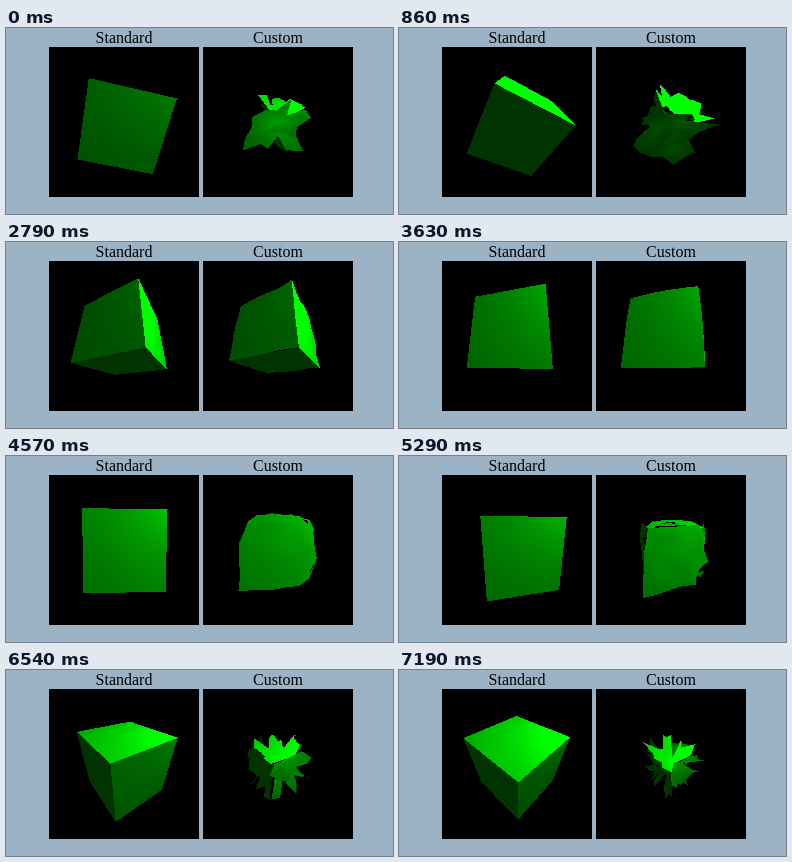
Recreate the animation shown at these times as an HTML page with a canvas. Size 387 px wide and 186 px high, loop 7290 ms.

```html
<!DOCTYPE html>
<html lang="en">
<head>
<meta charset="utf-8">
<title>Standard and custom cube</title>
<style>
  html, body { margin: 0; width: 100%; height: 100%; overflow: hidden; background: #9bb3c4; }
  #stage { position: relative; width: 387px; height: 186px; }
  .panel { position: absolute; top: 0; width: 150px; text-align: center;
           font: 16px/19px "Liberation Serif", "Times New Roman", serif; color: #000; }
  canvas { display: block; width: 150px; height: 150px; background: #000; }
</style>
</head>
<body>
<div id="stage">
  <div class="panel" style="left:43px">Standard<canvas id="standard" width="150" height="150"></canvas></div>
  <div class="panel" style="left:197px">Custom<canvas id="custom" width="150" height="150"></canvas></div>
</div>
<script>
const LOOP = 7290, LAST = 7190;
const SIZE = 150, HALF = SIZE / 2;
const FOCAL = 107, DISTANCE = 3.55;
const LIGHT = 2;                  // light sits at (2, 2, 2)
const AMBIENT = 51;
const BLACK = 0xff000000;

const mix = (a, b, k) => a + (b - a) * k;
const clamp = k => Math.min(1, Math.max(0, k));
const ease = k => { k = clamp(k); return k * k * (3 - 2 * k); };
const random = seed => { const r = Math.sin(seed * 12.9898) * 43758.5453; return r - Math.floor(r); };

// Poses are held in steps that slowly grow longer.
function heldTime(ms) {
  const first = 50, step = 57.6, growth = .0125;
  if (ms < first) return 0;
  const t = Math.min(ms, LAST);
  const n = Math.floor((Math.sqrt(step * step + 4 * growth * (t - first)) - step) / (2 * growth) + .2);
  return first + n * step + n * n * growth;
}

function rotate([x, y, z], angle) {
  const c = Math.cos(angle), s = Math.sin(angle);
  const rx = x * c + y * s, ry = y * c - x * s;
  return [rx, ry * c - z * s, ry * s + z * c];
}

function project(p) {
  const q = 1 / (DISTANCE - p[2]);
  return { q, x: HALF + FOCAL * p[0] * q, y: HALF - FOCAL * p[1] * q };
}

// Vertices spread from a crumpled core to the full cube and back, rounding its corners on the way.
function deformer(t) {
  const fold = 1 - Math.sin(Math.PI * t / LOOP);
  const rounding = ease((t - 3300) / 1200);
  return (p, seed) => {
    const wave = .5 + .5 * Math.sin(random(seed) * 2 * Math.PI + t / 900);
    const length = Math.hypot(...p);
    const round = rounding * clamp(1 + (p[0] + p[1]) / 2);
    const scale = (1 - fold * (.2 + .75 * wave)) * mix(1, Math.min(1, 1.36 / length), round);
    return p.map(v => v * scale);
  };
}

function makePanel(id, segments) {
  const ctx = document.getElementById(id).getContext("2d");
  const image = ctx.createImageData(SIZE, SIZE);
  const pixels = new Uint32Array(image.data.buffer);
  const depth = new Float32Array(SIZE * SIZE);

  function shade(x, y, w, normal) {
    const lx = LIGHT - (x - HALF) / FOCAL * w;
    const ly = LIGHT - (HALF - y) / FOCAL * w;
    const lz = LIGHT - DISTANCE + w;
    const lit = (normal[0] * lx + normal[1] * ly + normal[2] * lz) / Math.hypot(lx, ly, lz);
    return Math.min(255, Math.round(AMBIENT + 255 * Math.max(0, lit)));
  }

  function triangle(a, b, c, normal, side) {
    const area = (b.x - a.x) * (c.y - a.y) - (b.y - a.y) * (c.x - a.x);
    if (area * side > -1e-6) return;   // turned away from the viewer
    const x0 = Math.max(0, Math.floor(Math.min(a.x, b.x, c.x)));
    const x1 = Math.min(SIZE - 1, Math.ceil(Math.max(a.x, b.x, c.x)));
    const y0 = Math.max(0, Math.floor(Math.min(a.y, b.y, c.y)));
    const y1 = Math.min(SIZE - 1, Math.ceil(Math.max(a.y, b.y, c.y)));
    for (let j = y0; j <= y1; j++) {
      for (let i = x0; i <= x1; i++) {
        const x = i + .5, y = j + .5;
        const kb = ((x - a.x) * (c.y - a.y) - (y - a.y) * (c.x - a.x)) / area;
        const kc = ((b.x - a.x) * (y - a.y) - (b.y - a.y) * (x - a.x)) / area;
        const ka = 1 - kb - kc;
        if (Math.min(ka, kb, kc) < -1e-9) continue;
        const q = ka * a.q + kb * b.q + kc * c.q;
        const at = j * SIZE + i;
        if (q <= depth[at]) continue;
        depth[at] = q;
        pixels[at] = BLACK | shade(x, y, 1 / q, normal) << 8;
      }
    }
  }

  return (angle, deform = p => p) => {
    pixels.fill(BLACK);
    depth.fill(0);
    const row = segments + 1;
    for (let face = 0; face < 6; face++) {
      const axis = face >> 1, side = face & 1 ? -1 : 1;
      const direction = [0, 0, 0];
      direction[axis] = side;
      const normal = rotate(direction, angle);
      const points = [];
      for (let i = 0; i < row * row; i++) {
        const corner = [...direction];
        corner[(axis + 1) % 3] = i % row / segments * 2 - 1;
        corner[(axis + 2) % 3] = Math.floor(i / row) / segments * 2 - 1;
        points.push(project(deform(rotate(corner, angle), face * 100 + i + 1)));
      }
      for (let v = 0; v < segments; v++) {
        for (let u = 0; u < segments; u++) {
          const i = v * row + u;
          triangle(points[i], points[i + 1], points[i + row + 1], normal, side);
          triangle(points[i], points[i + row + 1], points[i + row], normal, side);
        }
      }
    }
    ctx.putImageData(image, 0, 0);
  };
}

const drawStandard = makePanel("standard", 1);
const drawCustom = makePanel("custom", 5);
const start = performance.now();
let shown = -1;

function update() {
  const t = heldTime((performance.now() - start) % LOOP);
  if (t !== shown) {
    shown = t;
    const angle = (12.4 + 17.3 * t / 1000) * Math.PI / 180;
    drawStandard(angle);
    drawCustom(angle, deformer(t));
  }
  requestAnimationFrame(update);
}
update();
</script>
</body>
</html>
```
